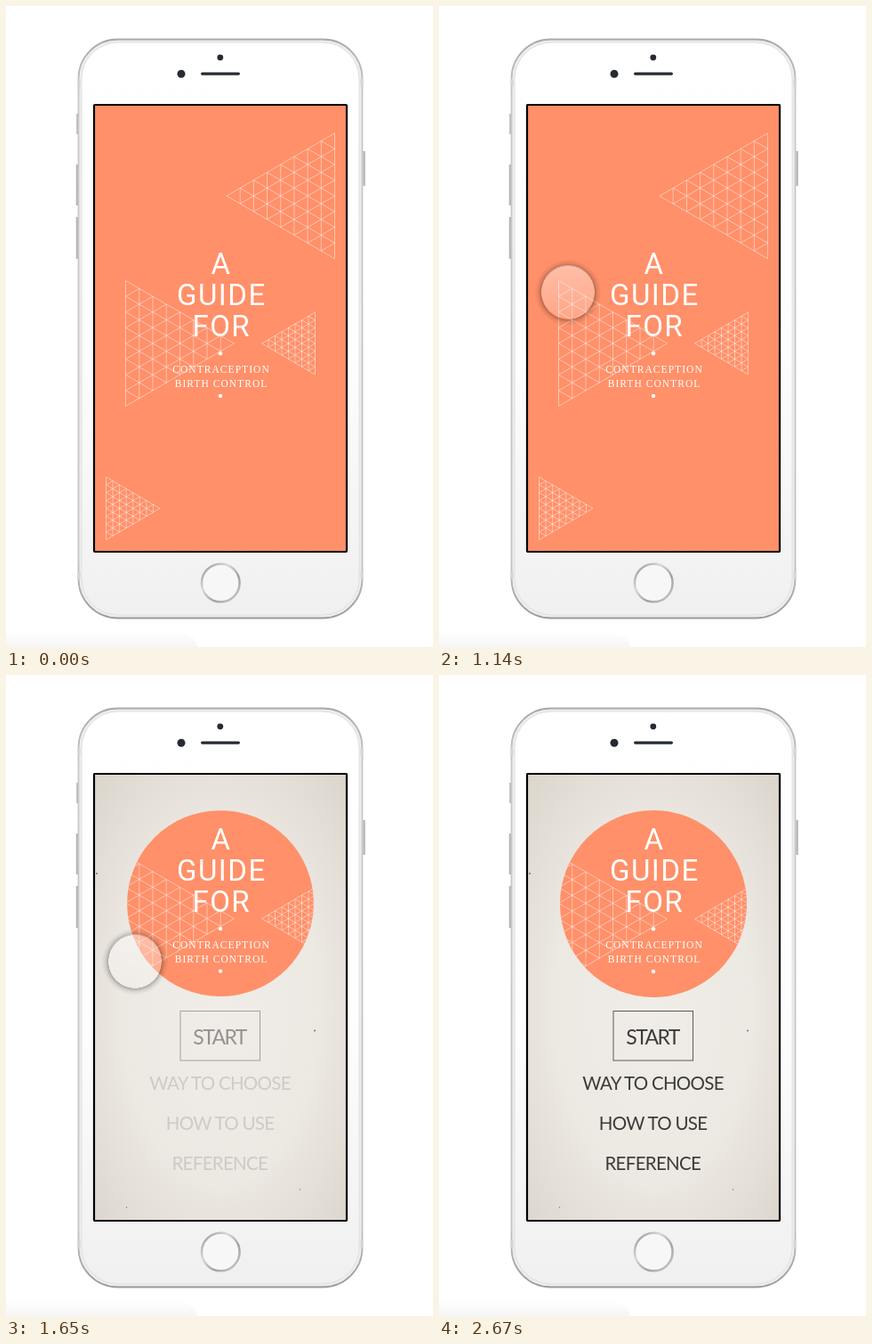
Write an HTML page that moves like this. It is 480 px wide and 720 px high and loops after 2700 ms.

```html
<!DOCTYPE html>
<html lang="en">
<head>
<meta charset="utf-8">
<title>A guide for</title>
<style>
  html, body { margin: 0; width: 100%; height: 100%; overflow: hidden; background: #fff; }
  svg { display: block; width: 480px; height: 720px; }
  text { text-anchor: middle; }
  .title { font: 33px Roboto, sans-serif; letter-spacing: 1.5px; fill: #fff; }
  .sub { font: 11.5px "Liberation Serif", serif; letter-spacing: 1.05px; fill: #fff; }
  .menu { font: 20.5px Lato, sans-serif; letter-spacing: -.7px; fill: #3c3b3a; }
  .start { font-size: 23px; letter-spacing: -1.6px; }
</style>
</head>
<body>
<svg viewBox="0 0 480 720">
  <defs>
    <linearGradient id="body" x2="0" y2="1">
      <stop offset="0" stop-color="#fff"/><stop offset=".55" stop-color="#fdfdfd"/><stop offset="1" stop-color="#f0f0f0"/>
    </linearGradient>
    <linearGradient id="rim" x2="0" y2="1">
      <stop offset="0" stop-color="#a9a9a9"/><stop offset=".1" stop-color="#c9c9c9"/>
      <stop offset=".9" stop-color="#c4c4c4"/><stop offset="1" stop-color="#999"/>
    </linearGradient>
    <linearGradient id="ring" x2="1" y2="1">
      <stop offset="0" stop-color="#8e8e8e"/><stop offset=".35" stop-color="#dadada"/>
      <stop offset=".65" stop-color="#a2a2a2"/><stop offset="1" stop-color="#d0d0d0"/>
    </linearGradient>
    <radialGradient id="paper" cx=".5" cy=".52" r=".72">
      <stop offset="0" stop-color="#f0ede8"/><stop offset=".55" stop-color="#ece8e2"/><stop offset="1" stop-color="#dbd5cc"/>
    </radialGradient>
    <linearGradient id="glass" x2="0" y2="1">
      <stop offset="0" stop-color="#fff" stop-opacity=".42"/><stop offset="1" stop-color="#fff" stop-opacity=".2"/>
    </linearGradient>
    <radialGradient id="halo">
      <stop offset=".79" stop-color="#000" stop-opacity="0"/><stop offset=".8" stop-color="#000" stop-opacity=".27"/>
      <stop offset=".89" stop-color="#000" stop-opacity=".09"/><stop offset="1" stop-color="#000" stop-opacity="0"/>
    </radialGradient>
    <linearGradient id="floor" x2="0" y2="1">
      <stop offset="0" stop-color="#fff"/><stop offset="1" stop-color="#f6f6f6"/>
    </linearGradient>
    <clipPath id="mask"><rect id="hole"/></clipPath>
  </defs>

  <path d="M0 702H180Q215 704 215 720H0Z" fill="url(#floor)"/>

  <path d="M80.500 121V144M80 178V224M80 237V284M402.500 163V202" stroke="#b5b5b5" stroke-width="2.500"/>
  <rect x="81.500" y="37.500" width="319" height="650" rx="44" fill="#ededed" stroke="url(#rim)" stroke-width="1.800"/>
  <rect x="85" y="41" width="312" height="643" rx="41" fill="url(#body)" stroke="#e0e0e0"/>
  <path d="M82 82V90M400 82V90M82 635V643M400 635V643" stroke="#d5d5d5" stroke-width="3"/>
  <g fill="#252b33">
    <circle cx="197" cy="76.300" r="4.500"/>
    <circle cx="240.800" cy="57.800" r="3.400"/>
    <rect x="219" y="74.500" width="44" height="3.200" rx="1.600"/>
  </g>
  <circle cx="241.300" cy="648" r="21.300" fill="#f7f7f7" stroke="url(#ring)" stroke-width="2.600"/>

  <rect x="99" y="111" width="284" height="502" fill="url(#paper)"/>
  <g fill="#77736e">
    <circle cx="347" cy="399.500" r="1"/><circle cx="102" cy="223" r="1"/>
    <circle cx="330.500" cy="578" r=".7"/><circle cx="135.500" cy="598" r=".7"/>
  </g>

  <g class="menu">
    <g id="start">
      <rect x="196" y="377.500" width="89.500" height="55.500" fill="none" stroke="#5b5a58"/>
      <text class="start" x="240" y="414.500">START</text>
    </g>
    <g id="links">
      <text x="240.600" y="466">WAY TO CHOOSE</text>
      <text x="240.600" y="511">HOW TO USE</text>
      <text x="240.300" y="556">REFERENCE</text>
    </g>
  </g>

  <g clip-path="url(#mask)">
    <rect x="99" y="111" width="284" height="502" fill="#ff9069"/>
    <g id="cover">
      <path id="grids" fill="none" stroke="#fff" stroke-opacity=".62" stroke-width=".75"/>
      <g class="title">
        <text x="242" y="301">A</text>
        <text x="242.300" y="336">GUIDE</text>
        <text x="242.300" y="371">FOR</text>
      </g>
      <g class="sub">
        <text x="242" y="412">CONTRACEPTION</text>
        <text x="242" y="428">BIRTH CONTROL</text>
        <circle cx="241" cy="390.300" r="2.200"/><circle cx="241" cy="438" r="2.200"/>
      </g>
    </g>
  </g>
  <rect x="99" y="111" width="284" height="502" rx="1" fill="none" stroke="#000" stroke-width="2.200"/>

  <g id="touch">
    <circle cy="1" r="37.500" fill="url(#halo)"/>
    <circle r="30" fill="url(#glass)"/>
  </g>
</svg>
<script>
  const LOOP = 2700;
  const el = id => document.getElementById(id);
  const clamp = v => Math.min(1, Math.max(0, v));
  const ramp = (t, start, length) => clamp((t - start) / length);
  const smooth = u => u * u * (3 - 2 * u);
  const setAll = (node, attrs) => {
    for (const name in attrs) node.setAttribute(name, attrs[name]);
  };

  // Triangular mesh: upright side at x, tip at x + depth, centred on y.
  function mesh(x, y, depth, half, n = 8) {
    let d = '';
    const line = (u1, v1, u2, v2) =>
      d += `M${x + depth * u1} ${y + half * v1}L${x + depth * u2} ${y + half * v2}`;
    for (let i = 0; i < n; i++) {
      const k = i / n;
      line(k, k - 1, k, 1 - k);
      for (const s of [1, -1]) line(0, s * (2 * k - 1), 1 - k, s * k);
    }
    return d;
  }

  el('grids').setAttribute('d',
    mesh(369.5, 213.3, -121.5, 70.5) + mesh(134.5, 379, 122, 70.5) +
    mesh(347.5, 379, -60, 35) + mesh(112.5, 564.3, 60.5, 35.3));

  // Damped spring from 0 to 1 whose first overshoot comes after 150 ms.
  function spring(ms) {
    if (ms <= 0) return 0;
    const w = Math.PI / 150, a = 1.784 / 150;
    return 1 - Math.exp(-a * ms) * (Math.cos(w * ms) + a / w * Math.sin(w * ms));
  }

  function draw(t) {
    const p = spring(t - 1170);
    const w = 284 - 74 * p, h = 502 - 292 * p, shift = -105 * p;
    setAll(el('hole'), {
      x: 241 - w / 2, y: 362 + shift - h / 2, width: w, height: h,
      rx: Math.min(105 * p, w / 2, h / 2)
    });
    el('cover').setAttribute('transform', `translate(0 ${shift})`);
    el('start').setAttribute('opacity', ramp(t, 1238, 820));
    el('links').setAttribute('opacity', ramp(t, 1510, 820));

    const s = smooth(ramp(t, 0, 900)) - smooth(ramp(t, 1905, 370));
    const bend = (a, b, c) => a * (1 - s) ** 2 + 2 * b * s * (1 - s) + c * s * s;
    el('touch').setAttribute('transform',
      `translate(${bend(-40, 151, 145)} ${bend(480, 389, 321)})`);
  }

  function tick() {
    draw(performance.now() % LOOP);
    requestAnimationFrame(tick);
  }
  tick();
</script>
</body>
</html>
```
